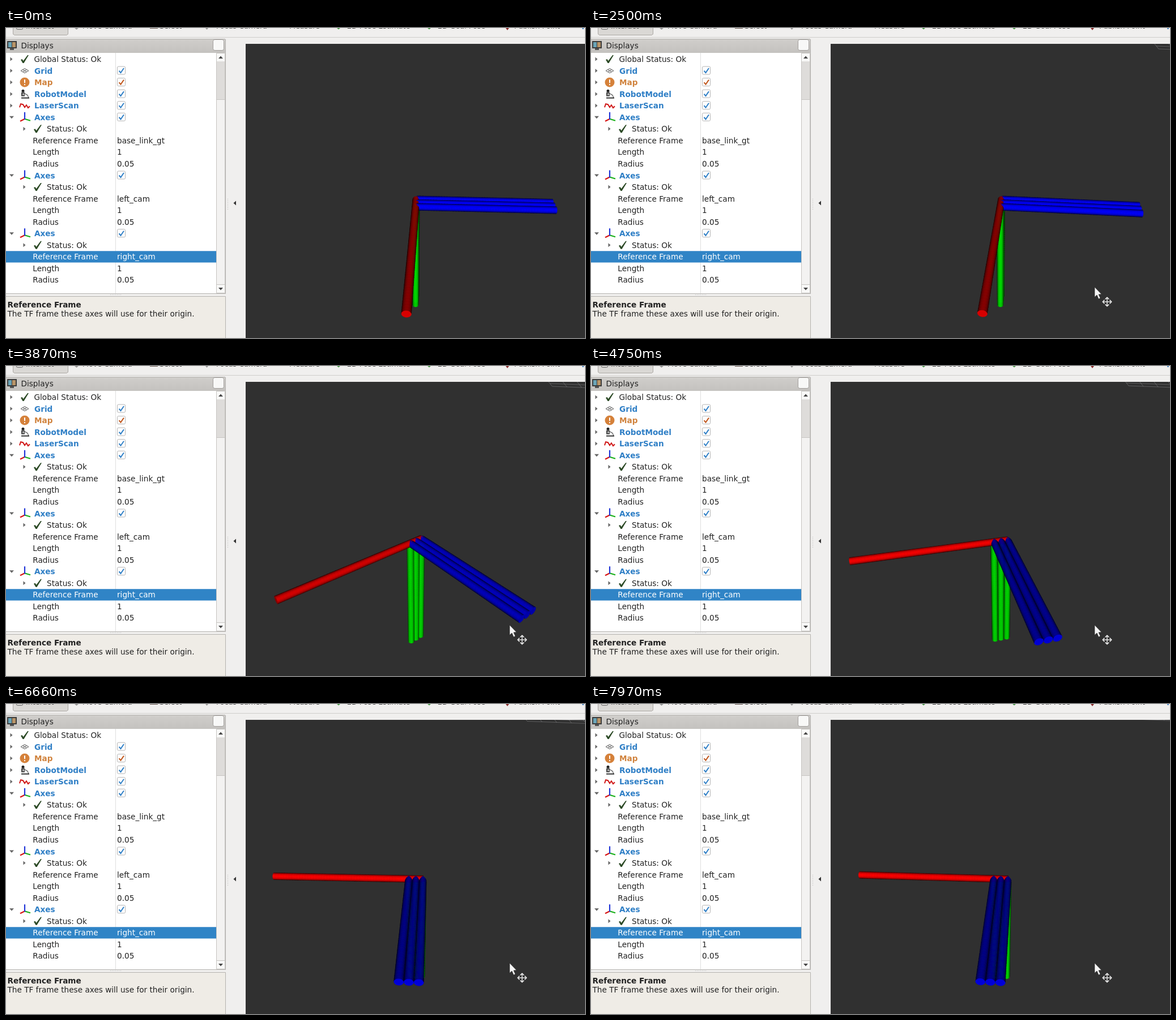
These frames come from a looping animation (1022 px wide and 548 px high, 8 s). An HTML page with a canvas:

```html
<!DOCTYPE html>
<html lang="en">
<head>
<meta charset="utf-8">
<title>Axes display</title>
<style>
  html, body { margin: 0; width: 100%; height: 100%; overflow: hidden; background: #f0efee; }
  canvas, svg { position: absolute; left: 0; top: 0; }
  #view { left: 423px; top: 28px; }
  text { font: 13.62px "DejaVu Sans", sans-serif; fill: #222; white-space: pre; }
  .bold { font-weight: bold; }
  .on { font-weight: bold; fill: #2f7fc6; }
  .warn { font-weight: bold; fill: #d0823c; }
  .sel { fill: #fff; }
  .tool { font-size: 12.7px; fill: #444; }
</style>
</head>
<body>
<canvas id="ui" width="1022" height="548"></canvas>
<canvas id="view" width="599" height="520"></canvas>
<svg id="labels" width="1022" height="548"></svg>
<script>
const ui = document.getElementById('ui').getContext('2d');
const view = document.getElementById('view').getContext('2d');
const labels = document.getElementById('labels');

// ---------- drawing helpers ----------
function rect(c, fill, x, y, w, h) {
  c.fillStyle = fill;
  c.fillRect(x, y, w, h);
}

function frame(c, stroke, x, y, w, h, r = 0) {
  c.strokeStyle = stroke;
  c.lineWidth = 1;
  c.beginPath();
  c.roundRect(x + .5, y + .5, w - 1, h - 1, r);
  c.stroke();
}

function trace(c, pts) {
  c.beginPath();
  pts.forEach(([x, y], i) => i ? c.lineTo(x, y) : c.moveTo(x, y));
}

function poly(c, fill, ...pts) {
  trace(c, pts);
  c.closePath();
  c.fillStyle = fill;
  c.fill();
}

function line(c, stroke, width, ...pts) {
  trace(c, pts);
  c.strokeStyle = stroke;
  c.lineWidth = width;
  c.stroke();
}

function disc(c, fill, x, y, r) {
  c.beginPath();
  c.arc(x, y, r, 0, 7);
  c.fillStyle = fill;
  c.fill();
}

function label(x, y, str, cls = '') {
  const el = document.createElementNS(labels.namespaceURI, 'text');
  el.setAttribute('x', x);
  el.setAttribute('y', y);
  el.setAttribute('class', cls);
  el.textContent = str;
  labels.append(el);
}

// ---------- side panel ----------
const rowY = i => 55 + i * 20.55;

function closedArrow(x, y) { poly(ui, '#666', [x - 1.5, y - 3.5], [x + 2.5, y], [x - 1.5, y + 3.5]); }
function openArrow(x, y) { poly(ui, '#666', [x - 4, y - 2], [x + 4, y - 2], [x, y + 2.5]); }

function okMark(x, y) {
  poly(ui, '#2c4a26', [x - 7, y + 1], [x - 4.5, y], [x - 2.5, y + 3], [x + 5, y - 7],
    [x + 7, y - 7], [x - 1.5, y + 7], [x - 3.5, y + 7]);
}

function checkBox(y, color) {
  rect(ui, '#fff', 197, y - 7, 14, 14);
  frame(ui, '#b4b4b4', 196, y - 8, 15, 15, 2);
  line(ui, color, 2, [199.5, y], [202.5, y + 3.5], [208, y - 4.5]);
}

const icons = {
  grid(x, y) {
    for (const k of [0, 1, 2]) {
      const dx = k * 3.5, dy = k * 2;
      line(ui, '#555', 1, [x - 7 + dx, y + dy], [x + dx, y - 4 + dy]);
      line(ui, '#555', 1, [x - 7 + dx, y - dy], [x + dx, y + 4 - dy]);
    }
  },
  map(x, y) {
    disc(ui, '#d5813a', x, y, 8.5);
    rect(ui, '#fff', x - 1, y - 5, 2, 6);
    rect(ui, '#fff', x - 1, y + 3, 2, 2);
  },
  robot(x, y) {
    disc(ui, '#222', x - 3, y - 5.5, 2.5);
    rect(ui, '#444', x - 6, y - 3, 6, 7);
    rect(ui, '#bbb', x - 4, y - 1, 3, 3);
    line(ui, '#555', 1.2, [x, y - 1], [x + 5, y + 2], [x + 7, y + 7]);
    line(ui, '#222', 1.8, [x - 6, y + 7], [x + 8, y + 7]);
  },
  laser(x, y) {
    line(ui, '#d01818', 2, [x - 9, y + 3], [x - 7, y - 3], [x - 3, y - 2], [x, y + 3],
      [x + 3, y - 1], [x + 6, y + 4], [x + 9, y + 1]);
  },
  axes(x, y) {
    line(ui, '#d81414', 2.2, [x, y + 3], [x - 8, y + 7]);
    line(ui, '#18b018', 2.2, [x, y + 3], [x + 10, y + 6]);
    line(ui, '#2035d8', 2.2, [x, y + 4], [x, y - 9]);
  }
};

function item(i, icon, name, cls = 'on') {
  const y = rowY(i);
  icons[icon](33, y);
  label(50, y + 5, name, cls);
  checkBox(y, cls === 'warn' ? '#c0561c' : '#2f7fc6');
}

function axesGroup(i, link, selected) {
  openArrow(10, rowY(i));
  item(i, 'axes', 'Axes');
  closedArrow(32, rowY(i + 1));
  okMark(56, rowY(i + 1));
  label(72, rowY(i + 1) + 5, 'Status: Ok');
  [['Reference Frame', link], ['Length', '1'], ['Radius', '0.05']].forEach(([key, val], k) => {
    const y = rowY(i + 2 + k), hot = selected && k === 0;
    if (hot) rect(ui, '#3084c6', 0, y - 10.1, 371, 20.3);
    label(47.3, y + 5, key, hot ? 'sel' : '');
    label(196, y + 5, val, hot ? 'sel' : '');
  });
}

function drawToolbar() {
  rect(ui, '#dad8d5', 12, 0, 98, 12);
  line(ui, '#aaa7a3', 1, [12.5, 0], [12.5, 10], [14.5, 12.5], [107.5, 12.5], [109.5, 10], [109.5, 0]);
  rect(ui, '#cfcdca', 0, 16, 1022, 1);
  [[35, 'Interact'], [135, 'Move Camera'], [271, 'Select'], [371, 'Focus Camera'], [500, 'Measure'],
    [602, '2D Pose Estimate'], [762, '2D Goal Pose'], [897, 'Publish Point']]
    .forEach(([x, name]) => label(x, .8, name, 'tool'));
  frame(ui, '#666', 18, -8, 12, 11, 2);
  poly(ui, '#999', [121, 0], [128, 0], [124.5, 3]);
  rect(ui, '#6a5a54', 254, 0, 14, 1);
  poly(ui, '#999', [352, 0], [357, 0], [354.5, 3]);
  for (const x of [588, 748]) poly(ui, '#4a9a4a', [x - 4, 0], [x + 2, 0], [x - 1, 2.5]);
  poly(ui, '#8c3030', [882, 0], [888, 0], [885, 4]);
  rect(ui, '#5a90c8', 1017, 0, 3, 2);
}

function drawPanel() {
  rect(ui, '#f0efee', 0, 0, 1022, 548);
  drawToolbar();

  const head = ui.createLinearGradient(0, 20, 0, 44);
  head.addColorStop(0, '#d0cecb');
  head.addColorStop(1, '#c4c2bf');
  rect(ui, head, 0, 20, 387, 24);
  rect(ui, '#b4b2af', 0, 19, 387, 1);
  label(26.5, 36, 'Displays');
  rect(ui, '#3c3c3c', 2, 23, 17, 13);
  rect(ui, '#6aa4b8', 4, 25, 6, 9);
  rect(ui, '#b89468', 11, 25, 6, 9);
  rect(ui, '#555', 7, 36, 7, 3);
  rect(ui, '#f8f8f7', 366, 21, 18, 18);
  frame(ui, '#a3a09d', 365, 20, 20, 20, 3);

  rect(ui, '#fff', 0, 44, 371, 425);
  rect(ui, '#dedede', 193, 44, 1, 425);

  rect(ui, '#f3f2f1', 371, 44, 16, 425);
  rect(ui, '#f9f9f8', 372, 44, 14, 15);
  rect(ui, '#f9f9f8', 372, 454, 14, 15);
  rect(ui, '#dedcda', 372, 59, 14, 67);
  frame(ui, '#c6c4c1', 371, 44, 16, 425);
  rect(ui, '#c6c4c1', 372, 126, 14, 1);
  rect(ui, '#c6c4c1', 372, 453, 14, 1);
  poly(ui, '#444', [375, 54], [383, 54], [379, 49.5]);
  poly(ui, '#444', [375, 459], [383, 459], [379, 463.5]);
  rect(ui, '#b4b2af', 0, 469, 388, 1);
  rect(ui, '#b4b2af', 387, 20, 1, 450);

  for (let k = 0; k < 7; k++) {
    rect(ui, '#bbb', 184 + k * 3, 471, 1, 1);
    rect(ui, '#bbb', 391, 302 + k * 3, 1, 1);
  }
  rect(ui, '#efece6', 0, 474, 387, 74);
  line(ui, '#b4b2af', 1, [0, 474.5], [387.5, 474.5], [387.5, 548]);
  label(2.5, 494, 'Reference Frame', 'bold');
  label(2.5, 510, 'The TF frame these axes will use for their origin.');
  poly(ui, '#333', [406, 305.5], [406, 313.5], [401.5, 309.5]);

  for (let i = 0; i < 5; i++) closedArrow(9, rowY(i));
  okMark(33, rowY(0));
  label(49.5, rowY(0) + 5, 'Global Status: Ok');
  item(1, 'grid', 'Grid');
  item(2, 'map', 'Map', 'warn');
  item(3, 'robot', 'RobotModel');
  item(4, 'laser', 'LaserScan');
  axesGroup(5, 'base_link_gt');
  axesGroup(10, 'left_cam');
  axesGroup(15, 'right_cam', true);
}

// ---------- motion ----------
const LOOP = 8000, STEP = 68;

// Monotone cubic through [time, value] keys
function curve(keys, t) {
  const n = keys.length - 1;
  if (t <= keys[0][0]) return keys[0][1];
  if (t >= keys[n][0]) return keys[n][1];
  const slope = i => (keys[i + 1][1] - keys[i][1]) / (keys[i + 1][0] - keys[i][0]);
  const tangent = i => {
    if (i === 0 || i === n) return 0;
    const a = slope(i - 1), b = slope(i);
    return a * b <= 0 ? 0 : 2 * a * b / (a + b);
  };
  let i = 0;
  while (keys[i + 1][0] < t) i++;
  const [t0, v0] = keys[i], [t1, v1] = keys[i + 1];
  const h = t1 - t0, u = (t - t0) / h, w = 1 - u;
  return v0 * (1 + 2 * u) * w * w + v1 * u * u * (3 - 2 * u) +
    h * u * w * (tangent(i) * w - tangent(i + 1) * u);
}

const yawKeys = [[0, 2.6], [850, 2.15], [1700, 2.3], [2500, 5.05], [3320, 27], [3870, 51.6],
  [4140, 59.5], [4750, 75.8], [4970, 78], [5660, 81.7], [5790, 82.3], [6660, 92.1], [7970, 93.1]];
const gridX = [[900, 1030], [2500, 1002], [3870, 964], [4750, 949], [5660, 934], [6660, 920], [7970, 908]];
const gridY = [[900, 39], [2500, 37], [3870, 36], [4750, 35], [5660, 33], [6660, 30.5], [7970, 25]];
const mouseX = [[500, 948], [920, 889]];
const mouseY = [[500, 550], [920, 458]];

// ---------- 3D view ----------
const CX = 723.5, CY = 309.3, DIST = 2.82, FOCAL = 241 * DIST;
const PITCH = 32 * Math.PI / 180, COS = Math.cos(PITCH), SIN = Math.sin(PITCH);
const RADIUS = .025, GAP = .0515, SIDES = 24, SLICE = .02;

const add = (a, b, k = 1) => a.map((v, i) => v + b[i] * k);
const dot = (a, b) => a[0] * b[0] + a[1] * b[1] + a[2] * b[2];
const toCam = (x, up, near) => [x, up * COS - near * SIN, near * COS + up * SIN];
const toEye = p => [-p[0], -p[1], DIST - p[2]];
function project(p) {
  const q = FOCAL / (DIST - p[2]);
  return [CX + q * p[0], CY - q * p[1]];
}

function shade(channel, normal) {
  const rgb = [0, 0, 0];
  rgb[channel] = Math.round(255 * Math.max(.1, normal[2]));
  return `rgb(${rgb})`;
}

// Collects the visible faces of a cylinder along axis a; u and v span its section.
// A mitred tube starts on the surface of an equal tube running along u.
function tube(faces, channel, o, a, u, v, from, to, mitred) {
  const count = Math.round((to - from) / SLICE);
  const rim = k => {
    const w = k / SIDES * 2 * Math.PI;
    const n = add(u.map(c => c * Math.cos(w)), v, Math.sin(w));
    return { n, p: add(o, n, RADIUS), start: mitred ? RADIUS * Math.abs(Math.cos(w)) : from };
  };
  const at = (r, f) => add(r.p, a, r.start + (to - r.start) * f);
  const put = (pts, mid, color) =>
    faces.push({ pts: pts.map(project), far: Math.hypot(...toEye(mid)), color });
  for (let k = 0; k < SIDES; k++) {
    const p = rim(k), mid = rim(k + .5), q = rim(k + 1);
    if (dot(mid.n, toEye(mid.p)) <= 0) continue;
    const color = shade(channel, mid.n);
    for (let i = 0; i < count; i++) {
      const s = i / count, e = (i + 1) / count;
      put([at(p, s), at(p, e), at(q, e), at(q, s)], at(mid, (s + e) / 2), color);
    }
  }
  for (const [end, sign] of [[from, -1], [to, 1]]) {
    const mid = add(o, a, end), n = a.map(c => c * sign);
    if ((mitred && sign < 0) || dot(n, toEye(mid)) <= 0) continue;
    const pts = Array.from({ length: SIDES }, (_, k) => add(rim(k).p, a, end));
    put(pts, mid, shade(channel, n));
  }
}

function drawAxes(yaw) {
  const c = Math.cos(yaw), s = Math.sin(yaw);
  const red = toCam(-s, 0, c), green = toCam(0, -1, 0), blue = toCam(c, 0, s);
  const faces = [];
  tube(faces, 0, [0, 0, 0], red, blue, green, -GAP, 1 + GAP, false);
  for (const k of [-1, 0, 1]) {
    const o = red.map(x => x * k * GAP);
    tube(faces, 1, o, green, red, blue, 0, 1, true);
    tube(faces, 2, o, blue, red, green, 0, 1, true);
  }
  faces.sort((a, b) => b.far - a.far);
  view.lineWidth = .4;
  view.lineJoin = 'round';
  for (const f of faces) {
    poly(view, f.color, ...f.pts);
    view.strokeStyle = f.color;
    view.stroke();
  }
}

function drawFloorGrid(t) {
  if (t < 900) return;
  const x = curve(gridX, t), y = curve(gridY, t), tilt = .038, lean = .8;
  const color = 'rgba(165,165,168,.38)';
  for (let r = 0; r < 2; r++) {
    const px = x - r * 5 * lean, py = y - r * 5;
    line(view, color, 1, [px, py], [px + 140, py + 140 * tilt]);
  }
  for (let k = 0; k < 5; k++) {
    const px = x + k * 26, py = y + k * 26 * tilt;
    line(view, color, 1, [px, py], [px - 14 * lean, py - 14]);
  }
}

function drawMouse(t) {
  if (t < 500) return;
  view.save();
  view.translate(curve(mouseX, t), curve(mouseY, t));
  poly(view, '#f4f4f4', [0, 0], [0, 17.5], [4, 14], [7, 21], [10, 19.6], [7, 13], [12, 12.5]);
  view.strokeStyle = '#2a2a2a';
  view.lineWidth = .6;
  view.stroke();
  view.translate(22, 26);
  for (let k = 0; k < 4; k++) {
    line(view, '#f0f0f0', 1.4, [0, 0], [0, -7.5]);
    line(view, '#f0f0f0', 1.6, [-3.2, -4.6], [0, -7.8], [3.2, -4.6]);
    view.rotate(Math.PI / 2);
  }
  view.restore();
}

function drawView(t) {
  view.setTransform(1, 0, 0, 1, -423, -28);
  rect(view, '#303030', 423, 28, 599, 520);
  drawFloorGrid(t);
  drawAxes(curve(yawKeys, t) * Math.PI / 180);
  drawMouse(t);
}

let shown = -1;
const start = performance.now();
function tick() {
  const t = (performance.now() - start) % LOOP;
  const step = Math.floor((t + 20) / STEP);
  if (step !== shown) {
    shown = step;
    drawView(Math.max(0, step * STEP - 12));
  }
  requestAnimationFrame(tick);
}

drawPanel();
tick();
</script>
</body>
</html>
```
